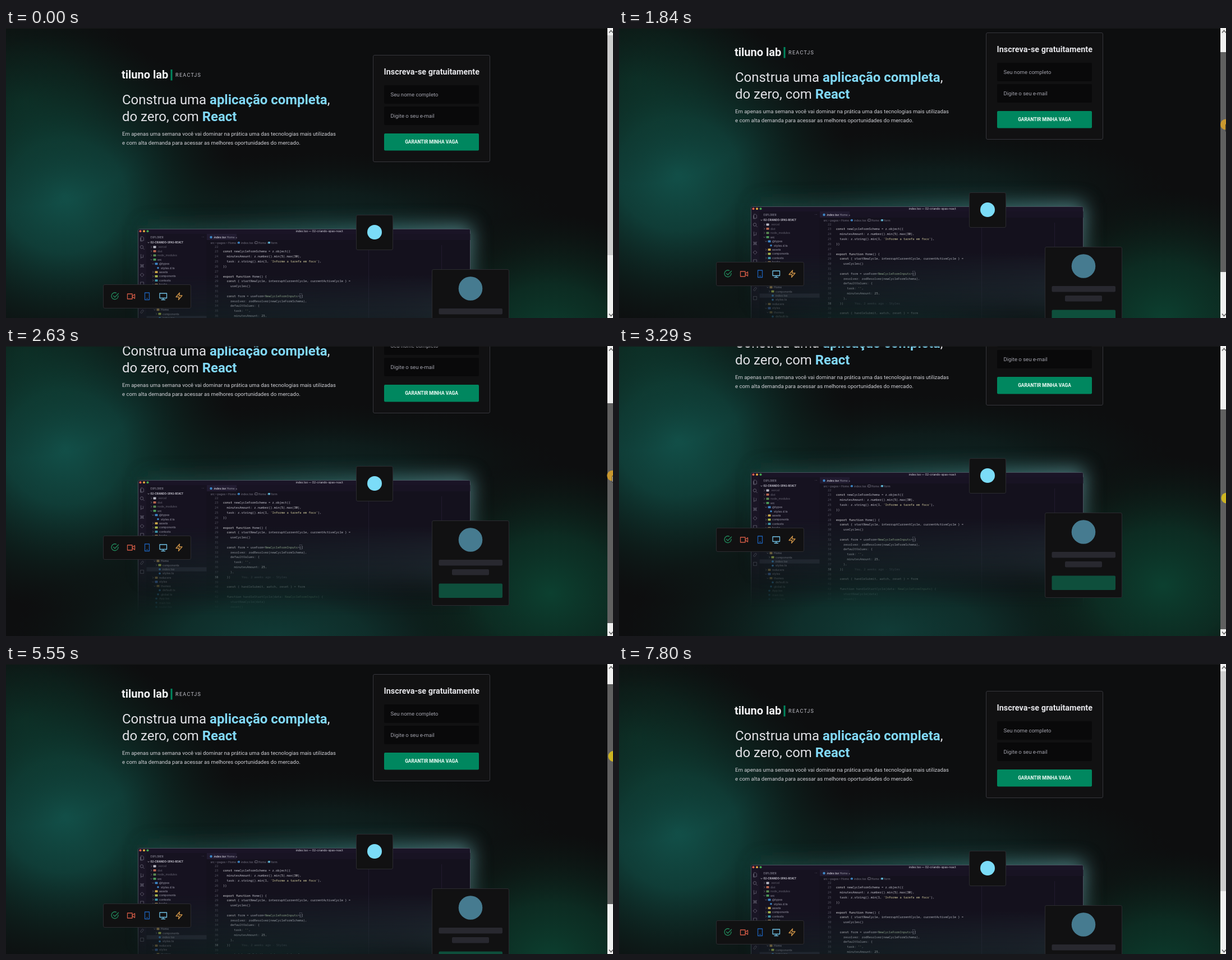
Recreate the animation shown at these times as an HTML page. Size 1082 by 517 pixels, loop 7.94 s.

```html
<!DOCTYPE html>
<html lang="pt-BR">
<head>
<meta charset="utf-8">
<title>tiluno lab</title>
<style>
  html, body { margin: 0; width: 100%; height: 100%; overflow: hidden; background: #0d0e0f; }
  svg { display: block; width: 1082px; height: 517px; }
  text { font-family: Roboto, sans-serif; }
  .h { font-size: 23.95px; fill: #e1e1e6; }
  .h tspan { font-weight: 700; fill: #81d8f7; }
  .p { font-size: 9.56px; fill: #d2d2d8; }
  .field { font-size: 9.56px; fill: #a3a3ad; }
  .code text { font: 500 5.42px "Noto Sans Mono", monospace; fill: #c3c2cd; }
  .code .s { fill: #d6cfa0; }
  .code .n { fill: #e8e6ea; }
  .code .t { fill: #a9c09f; }
  .code .num { fill: #595866; }
  .ui text { font: 500 5px Inter, sans-serif; fill: #8f8d9c; }
  .card { fill: #111112; stroke: #2b2b30; }
  .icons path { fill: none; stroke-width: 1.3; stroke-linecap: round; stroke-linejoin: round; }
  .bar path { fill: none; stroke: #5f5c6c; stroke-width: .9; }
</style>
</head>
<body>
<svg viewBox="0 0 1082 517">
  <defs>
    <radialGradient id="teal">
      <stop offset="0" stop-color="#125049"/>
      <stop offset=".35" stop-color="#10453e" stop-opacity=".85"/>
      <stop offset=".7" stop-color="#0d3029" stop-opacity=".4"/>
      <stop offset="1" stop-color="#0d201c" stop-opacity="0"/>
    </radialGradient>
    <radialGradient id="green">
      <stop offset="0" stop-color="#0c4030"/>
      <stop offset=".45" stop-color="#0c3528" stop-opacity=".75"/>
      <stop offset="1" stop-color="#0c2018" stop-opacity="0"/>
    </radialGradient>
    <linearGradient id="halo">
      <stop offset="0" stop-color="#2b7a70" stop-opacity=".35"/>
      <stop offset=".6" stop-color="#4a9a98" stop-opacity=".55"/>
      <stop offset="1" stop-color="#6fb4b8" stop-opacity=".7"/>
    </linearGradient>
    <linearGradient id="fadeDown" x2="0" y2="1">
      <stop offset="0" stop-color="#fff"/>
      <stop offset=".35" stop-color="#fff"/>
      <stop offset=".68" stop-color="#888"/>
      <stop offset="1" stop-color="#000"/>
    </linearGradient>
    <filter id="soft" x="-30%" y="-60%" width="160%" height="220%"><feGaussianBlur stdDeviation="17"/></filter>
    <mask id="fade" maskUnits="userSpaceOnUse" x="230" y="355" width="605" height="250">
      <rect x="230" y="355" width="605" height="243" fill="url(#fadeDown)"/>
    </mask>
    <mask id="haloFade" maskUnits="userSpaceOnUse" x="100" y="250" width="900" height="350">
      <rect x="100" y="250" width="900" height="340" fill="url(#fadeDown)"/>
    </mask>
  </defs>

  <g id="page">
    <rect width="1082" height="660" fill="#0d0e0f"/>
    <ellipse cx="105" cy="300" rx="310" ry="290" fill="url(#teal)"/>
    <ellipse cx="30" cy="130" rx="240" ry="190" fill="url(#green)" opacity=".45"/>
    <ellipse cx="480" cy="640" rx="470" ry="190" fill="url(#teal)" opacity=".68"/>
    <ellipse cx="970" cy="560" rx="270" ry="230" fill="url(#green)"/>
    <ellipse cx="560" cy="330" rx="430" ry="110" fill="url(#teal)" opacity=".3"/>
    <g mask="url(#haloFade)">
      <rect x="245" y="352" width="585" height="190" fill="url(#halo)" filter="url(#soft)"/>
    </g>

    <text x="206" y="90" font-size="20" font-weight="700" fill="#f4f4f6">tiluno lab</text>
    <rect x="293.5" y="74" width="3" height="19.5" fill="#00875f"/>
    <text x="302" y="87" font-size="9" letter-spacing="1.35" fill="#c4c4cc">REACTJS</text>
    <text class="h" x="207" y="136">Construa uma <tspan>aplicação completa</tspan>,</text>
    <text class="h" x="207" y="166">do zero, com <tspan>React</tspan></text>
    <text class="p" x="207" y="192">Em apenas uma semana você vai dominar na prática uma das tecnologias mais utilizadas</text>
    <text class="p" x="207" y="208">e com alta demanda para acessar as melhores oportunidades do mercado.</text>

    <rect class="card" style="stroke:#36363c" x="654.5" y="48.5" width="208" height="190" rx="2.5"/>
    <text x="673.5" y="82.5" font-size="14.4" font-weight="700" fill="#e6e6ea">Inscreva-se gratuitamente</text>
    <rect x="674" y="102" width="169" height="33" rx="2" fill="#09090a"/>
    <rect x="674" y="140" width="169" height="33" rx="2" fill="#09090a"/>
    <text class="field" x="685.5" y="121.5">Seu nome completo</text>
    <text class="field" x="685.5" y="159.5">Digite o seu e-mail</text>
    <rect x="674" y="188" width="169" height="30.5" rx="2" fill="#00875f"/>
    <text x="758.5" y="206" font-size="8.4" font-weight="700" fill="#f4fffa" text-anchor="middle">GARANTIR MINHA VAGA</text>

    <g mask="url(#fade)">
      <rect x="235.5" y="358.5" width="592" height="250" rx="3" fill="#14111d" stroke="#47505c"/>
      <rect x="236" y="359" width="591" height="8" rx="2" fill="#1a1426"/>
      <rect x="236" y="367" width="14.5" height="240" fill="#1a1525"/>
      <rect x="250.5" y="367" width="107" height="240" fill="#161220"/>
      <rect x="250.5" y="513.4" width="107" height="7.4" fill="#2b2839"/>
      <rect x="357.5" y="367" width="470" height="11" fill="#181323"/>
      <rect x="358" y="367" width="53" height="11" fill="#211b30"/>
      <path d="M646.5 387V600M776.5 387V600" stroke="#241f31" stroke-width=".8"/>
      <circle cx="239.5" cy="362.3" r="2" fill="#e0604f"/>
      <circle cx="246" cy="362.3" r="2" fill="#dfa93c"/>
      <circle cx="252.5" cy="362.3" r="2" fill="#43a852"/>
      <g class="bar">
        <path d="M240.500 372h3l2 2v5h-5zM239.500 374v6h4" stroke="#d5d3dd"/>
        <path d="M244.500 392.500l2 2.500"/><circle cx="242" cy="390.500" r="2.700" fill="none" stroke="#5f5c6c"/>
        <path d="M240.500 405v6M240.500 409h4v-3M239.500 404h2M243.500 405h2"/>
        <path d="M240.500 422h4v4h-4zM239 421l7 6M246 421l-7 6"/>
        <path d="M242.500 437l3.500 3-3.500 3.500-3.500-3.500z"/>
        <path d="M239.500 453h6v6h-6z"/>
        <path d="M239.500 507l4-5 2 2-4 5zM239.500 518.500h6v6h-6z"/>
      </g>
      <g class="ui" id="ui"></g>
      <g class="code" id="code"></g>
    </g>

    <g class="icons">
      <rect class="card" x="173.500" y="457.500" width="156" height="42" rx="2.500"/>
      <path stroke="#218a5c" d="M200 477.500a6 6 0 1 1-3.500-5.200M191.500 477.500l2.500 2.500 6.500-6.700"/>
      <path stroke="#d05a45" d="M216.500 474h8.500v9h-8.500zM225 478l4.500-3.300v7.600l-4.500-3.300"/>
      <path stroke="#1d5fb4" d="M247.500 472h8v12.500h-8zM251 482h1"/>
      <path stroke="#72c2e6" d="M274 473h12.500v8.500H274zM280.200 481.500v3M277 484.500h6.500"/>
      <path stroke="#c99046" d="M309.500 472l-6.500 7.500h5.500l-1 5 6.500-7.500h-5.500z"/>
    </g>

    <rect class="card" x="624.500" y="333.500" width="65" height="62" rx="2.500"/>
    <circle cx="657" cy="364" r="13" fill="#7bdcf8"/>

    <rect class="card" x="759.500" y="430.500" width="137" height="151" rx="2.500"/>
    <circle cx="828" cy="464.500" r="21.300" fill="#467b90"/>
    <rect x="771.500" y="500" width="113.500" height="10.500" rx="2" fill="#28282f"/>
    <rect x="795" y="517" width="66" height="10.500" rx="2" fill="#28282f"/>
    <rect x="771.500" y="542.500" width="113.500" height="25.500" rx="2" fill="#0e4f3c"/>
  </g>

  <rect width="1072" height="1" fill="#18191a"/>
  <rect x="1072" width="10" height="517" fill="#f0f0f0"/>
  <path d="M1075 8.500l3.500-4 3.500 4M1075 509.500l3.500 4 3.500-4" fill="none" stroke="#606060" stroke-width="1.500"/>
  <rect id="thumb" x="1072" y="13" width="10" height="392"/>
  <g id="pointer">
    <circle r="9.500"/>
    <path d="M0 0v12l2.800-2.600 2 4.400 2-1-2-4.200h3.800z" fill="#fff" stroke="#111" stroke-width=".8"/>
  </g>
</svg>

<script>
const LOOP = 7940;
const $ = id => document.getElementById(id);
const clamp = (v, lo, hi) => Math.min(hi, Math.max(lo, v));
const esc = s => s.replace(/&/g, '&amp;').replace(/</g, '&lt;');
const label = (x, y, s, attrs = '') => `<text x="${x}" y="${y}" ${attrs}>${s}</text>`;

// Editor contents
const source = `
const newCycleFormSchema = z.object({
  minutesAmount: z.number().min(5).max(30),
  task: z.string().min(1, 'Informe a tarefa em foco'),
})

export function Home() {
  const { startNewCycle, interruptCurrentCycle, currentActiveCycle } =
    useCycles()

  const form = useForm<NewCycleFormInputs>({
    resolver: zodResolver(newCycleFormSchema),
    defaultValues: {
      task: '',
      minutesAmount: 25,
    },
  })

  const { handleSubmit, watch, reset } = form

  function handleStartCycle(data: NewCycleFormInputs) {
    startNewCycle(data)
    reset()`.split('\n');

const paint = s => esc(s).replace(/('[^']*')|(NewCycleFormInputs)|\b(\d+|const|export|function)\b/g,
  (m, str, type) => `<tspan class="${str ? 's' : type ? 't' : 'n'}">${m}</tspan>`);

$('code').innerHTML = source.map((line, i) => {
  const y = 391.6 + i * 8.82, indent = line.search(/\S|$/), current = i === 16;
  return label(378.5, y, 22 + i, current ? 'text-anchor="end"' : 'class="num" text-anchor="end"') +
    label(387 + indent * 3.25, y, paint(line.trim())) +
    (current ? label(420, y, 'You, 2 weeks ago · Styles', 'class="num"') : '');
}).join('') + '<rect x="523.500" y="473.500" width="4" height="8" fill="none" stroke="#6b6979" stroke-width=".5"/>';

const tree = ('1>.vercel 1>dist 1>node_modules 1vsrc 2v@types 3-styles.d.ts 2>assets 2>components 2>contexts ' +
  '2>hooks 2>layouts 2>lib 2>models 2vpages 3>History 3vHome 4>components 4-index.tsx 4-styles.ts ' +
  '2>reducers 2vstyles 3vthemes 4-default.ts 3-global.ts 2-App.tsx 2-main.tsx 2-router.tsx').split(' ');
const folderColors = { src: '#4b9a58', '@types': '#3d86c6', assets: '#c9a548', components: '#a8b84c', contexts: '#3f9cb0',
  styles: '#4a76c8', pages: '#c96a4a', '.vercel': '#b9b9c4', dist: '#b9654f', node_modules: '#5a8a52' };

const row = (item, i) => {
  const y = 392.3 + i * 7.45, depth = +item[0], name = item.slice(2), file = item[1] === '-';
  const x = 257.5 + (depth - 1) * 3;
  const arrow = file ? '' : `<path d="${item[1] === 'v' ? `M${x} ${y - 2.5}l1.500 1.600 1.500-1.600` : `M${x + .8} ${y - 3.3}l1.600 1.500-1.600 1.500`}" fill="none" stroke="#8f8d9c" stroke-width=".6"/>`;
  const icon = file ? `<circle cx="${x + 7.5}" cy="${y - 1.8}" r="1.800" fill="#3d86c6"/>`
    : `<rect x="${x + 5}" y="${y - 3.7}" width="5" height="3.800" rx=".6" fill="${folderColors[name] || '#9a7d4c'}"/>`;
  const tone = /^(\.v|dist|node)/.test(name) ? 'style="fill:#5d5b69"' : '';
  return arrow + icon + label(x + 12.5, y, name, tone);
};

$('ui').innerHTML =
  label(558.5, 364.2, 'index.tsx — 02-criando-spas-react', 'text-anchor="middle" style="fill:#c5c3ce"') +
  label(257.5, 374.8, 'EXPLORER', 'style="font-size:4.500px"') + label(349, 374, '···') +
  label(257.5, 384.2, '02-CRIANDO-SPAS-REACT', 'style="font-size:4.400px;font-weight:700;fill:#c5c3ce"') +
  '<path d="M252.500 381.700l1.500 1.600 1.500-1.600" fill="none" stroke="#c5c3ce" stroke-width=".7"/>' +
  '<circle cx="365.500" cy="373" r="2.200" fill="#3d86c6"/>' +
  label(370.5, 374.9, '<tspan font-style="italic" style="fill:#dddbe5">index.tsx</tspan> Home ×') +
  label(364.5, 384.5, 'src › pages › Home ›', 'style="fill:#6a6877"') +
  '<circle cx="415" cy="382.700" r="2" fill="#3d86c6"/>' +
  label(419, 384.5, 'index.tsx ›', 'style="fill:#6a6877"') +
  '<rect x="444" y="380.800" width="4" height="3.800" fill="none" stroke="#8f8d9c" stroke-width=".6"/>' +
  label(449.5, 384.5, 'Home ›', 'style="fill:#6a6877"') +
  '<rect x="467" y="381" width="4" height="3.400" fill="#5aa9c8"/>' +
  label(472.5, 384.5, 'form', 'style="fill:#6a6877"') +
  tree.map(row).join('');

// Pointer path: time, x, y
const path = [
  [0, 1095, 520], [379, 1095, 520], [380, 1071, 490], [445, 1074, 430], [510, 1095, 372],
  [970, 1095, 142], [1299, 1095, 142], [1300, 1083, 142], [1590, 1083, 142], [1840, 1081.5, 172],
  [2360, 1080, 215], [3290, 1083, 271], [3620, 1083, 297], [3820, 1083, 297], [4020, 1083, 291],
  [4490, 1083, 291], [4680, 1083, 279], [5020, 1083, 279], [5080, 1083, 274], [5820, 1083, 102],
  [6010, 1083, 96], [6209, 1083, 96], [6210, 1095, 96], [6410, 1088, 130], [7005, 1063, 490],
  [7070, 1073, 530], [7799, 1073, 530], [7800, 1073, 526], [LOOP, 1073, 526]
];

function pointerAt(t) {
  const i = path.findIndex(k => k[0] > t);
  const [t0, x0, y0] = path[i - 1], [t1, x1, y1] = path[i];
  const k = (t - t0) / (t1 - t0);
  return [x0 + (x1 - x0) * k, y0 + (y1 - y0) * k];
}

function thumbColor(t) {
  if (t >= 1300 && t < 6210) return '#606060';
  return t >= 970 && t < 6480 ? '#a6a6a6' : '#cdcdcd';
}

const start = performance.now();
function draw(now) {
  const t = Math.max(0, now - start) % LOOP;
  const [x, y] = pointerAt(t);
  const dragging = t >= 1300 && t < 6210;
  const scroll = dragging ? Math.round(clamp((y - 142) * 1.33, 0, 133)) : 0;
  $('page').setAttribute('transform', `translate(0 ${-scroll})`);
  $('thumb').setAttribute('y', 13 + Math.round(scroll * .752));
  $('thumb').setAttribute('fill', thumbColor(t));
  $('pointer').setAttribute('transform', `translate(${x} ${y})`);
  $('pointer').setAttribute('fill', t > 1300 && t < 2800 ? '#c9972f' : '#cdb422');
  requestAnimationFrame(draw);
}
draw(start);
</script>
</body>
</html>
```
